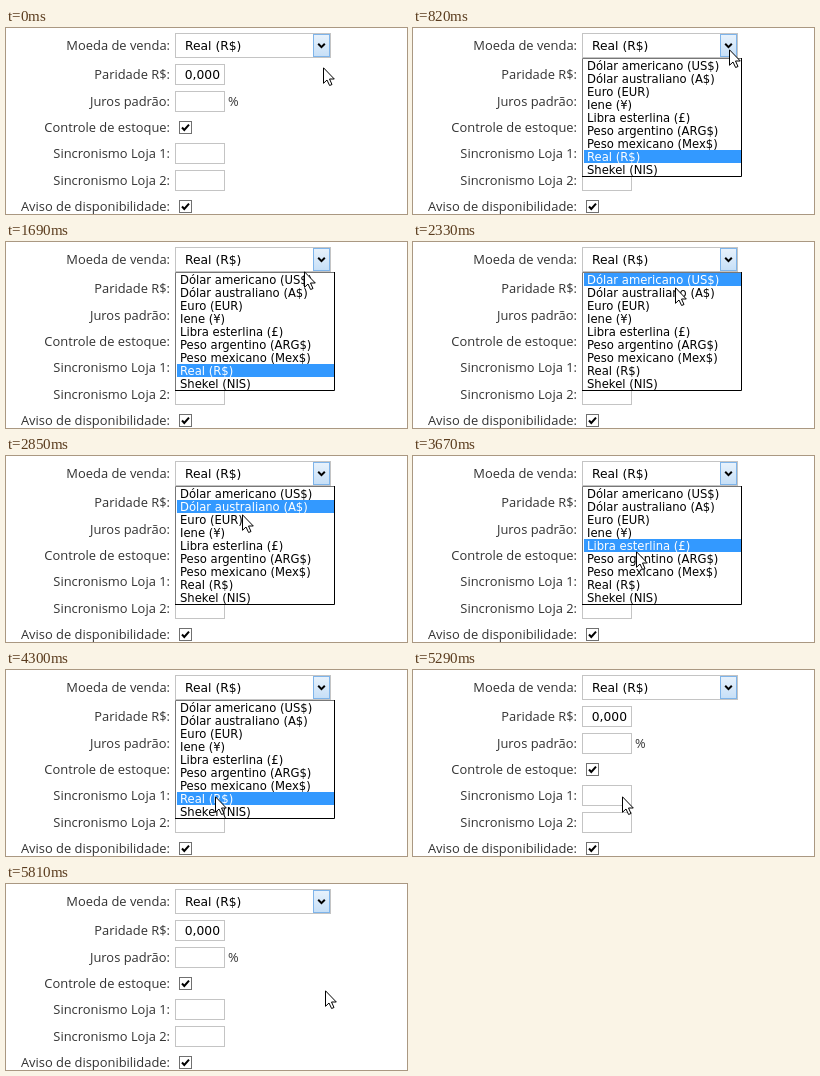
Animation of 401 by 186 pixels, one loop 6490 ms. Source, as an HTML page:

```html
<!DOCTYPE html>
<html lang="pt-BR">
<head>
<meta charset="utf-8">
<title>Moeda de venda</title>
<style>
  html, body { margin: 0; width: 100%; height: 100%; overflow: hidden; background: #fff; }
  svg { position: absolute; left: 0; top: 0; display: block; }
  .labels { font: 12.9px "Open Sans", sans-serif; fill: #333; }
  .end { text-anchor: end; }
  .value { font: 12.3px "DejaVu Sans", Verdana, sans-serif; fill: #000; }
  .field { fill: #fff; stroke: #c4c4c4; }
  .options { font: 11.6px "DejaVu Sans", Verdana, sans-serif; }
  .menu, .hot, .pointer { animation: 6490ms step-end infinite; }
  .menu { left: 169px; top: 30px; animation-name: open; }
  .hot {
    left: 171px; top: 31px; --r: 7;
    clip-path: inset(calc(var(--r) * 13px) 0 calc((8 - var(--r)) * 13px) 0);
    animation-name: open, pick;
  }
  .pointer { animation-name: move; }

  @keyframes open {
    0% { visibility: hidden; }
    10.78% { visibility: visible; }
    81.5%, 100% { visibility: hidden; }
  }
  @keyframes pick {
    0% { --r: 7; }
    27.88% { --r: 0; }
    37.75% { --r: 1; }
    45.76% { --r: 2; }
    50.53% { --r: 3; }
    54.23% { --r: 4; }
    60.7% { --r: 5; }
    62.55% { --r: 6; }
    64.4%, 100% { --r: 7; }
  }
  @keyframes move {
    0% { transform: translate(317px, 39px); }
    6.62% { transform: translate(319px, 31px); }
    8.47% { transform: translate(318px, 23px); }
    10.78% { transform: translate(317px, 22px); }
    12.63% { transform: translate(316px, 21px); }
    26.04% { transform: translate(298px, 29px); }
    27.88% { transform: translate(278px, 37px); }
    29.73% { transform: translate(267px, 42px); }
    32.04% { transform: translate(266px, 42px); }
    35.9% { transform: translate(262px, 45px); }
    37.75% { transform: translate(255px, 50px); }
    39.59% { transform: translate(249px, 53px); }
    43.91% { transform: translate(236px, 58px); }
    45.76% { transform: translate(233px, 67px); }
    50.53% { transform: translate(228px, 74px); }
    52.38% { transform: translate(225px, 80px); }
    54.23% { transform: translate(223px, 84px); }
    56.54% { transform: translate(223px, 95px); }
    58.85% { transform: translate(221px, 102px); }
    60.7% { transform: translate(218px, 110px); }
    62.55% { transform: translate(214px, 117px); }
    64.4% { transform: translate(211px, 123px); }
    66.25% { transform: translate(209px, 126px); }
    85.36% { transform: translate(227px, 123px); }
    87.67% { transform: translate(275px, 113px); }
    89.52%, 100% { transform: translate(319px, 106px); }
  }
</style>
</head>
<body>
<svg width="401" height="186">
  <defs>
    <linearGradient id="button" x2="0" y2="1">
      <stop offset="0" stop-color="#e8f2fc"/>
      <stop offset="1" stop-color="#c6dff7"/>
    </linearGradient>
    <g id="check">
      <rect x=".5" y=".5" width="12" height="12" fill="#fff" stroke="#707070"/>
      <path d="M3 6.5L5.3 9L10 3.6" fill="none" stroke="#000" stroke-width="2"/>
    </g>
    <rect id="box" x="169.5" y=".5" width="49" height="20"/>
    <g id="options" class="options">
      <text x="3" y="11">Dólar americano (US$)</text>
      <text x="3" y="24">Dólar australiano (A$)</text>
      <text x="3" y="37">Euro (EUR)</text>
      <text x="3" y="50">Iene (¥)</text>
      <text x="3" y="63">Libra esterlina (£)</text>
      <text x="3" y="76">Peso argentino (ARG$)</text>
      <text x="3" y="89">Peso mexicano (Mex$)</text>
      <text x="3" y="102">Real (R$)</text>
      <text x="3" y="115">Shekel (NIS)</text>
    </g>
  </defs>

  <g class="labels">
    <g class="end">
      <text x="164" y="22">Moeda de venda:</text>
      <text x="164" y="51">Paridade R$:</text>
      <text x="164" y="78">Juros padrão:</text>
      <text x="164" y="104">Controle de estoque:</text>
      <text x="164" y="130">Sincronismo Loja 1:</text>
      <text x="164" y="157">Sincronismo Loja 2:</text>
      <text x="164" y="183">Aviso de disponibilidade:</text>
    </g>
    <text x="222" y="78">%</text>
  </g>

  <g class="field">
    <rect x="169.5" y="5.5" width="155" height="24"/>
    <use href="#box" y="36"/>
    <use href="#box" y="63"/>
    <use href="#box" y="115"/>
    <use href="#box" y="142"/>
  </g>
  <rect x="307.5" y="6.5" width="16" height="22" fill="url(#button)" stroke="#7eb4ea"/>
  <path d="M312.2 15.8L315.5 19.1L318.8 15.8" fill="none" stroke="#000" stroke-width="2"/>
  <text class="value" x="179" y="22">Real (R$)</text>
  <text class="value end" x="214" y="51">0,000</text>
  <use href="#check" x="173" y="93"/>
  <use href="#check" x="173" y="172"/>
</svg>

<svg class="menu" width="160" height="119">
  <rect width="160" height="119" fill="#fff"/>
  <path d="M.5 119V.5H160" fill="none" stroke="#777"/>
  <path d="M0 118.5H159.5V0" fill="none" stroke="#000"/>
  <use href="#options" x="2" y="1"/>
</svg>

<svg class="hot" width="157" height="117">
  <rect width="157" height="117" fill="#39f"/>
  <use href="#options" fill="#fff"/>
</svg>

<svg class="pointer" width="13" height="20">
  <path d="M.5 .8V16.3L4 13L6.6 18.5L9 17.5L6.5 12H11.3Z" fill="#fff" stroke="#000"/>
</svg>
</body>
</html>
```
